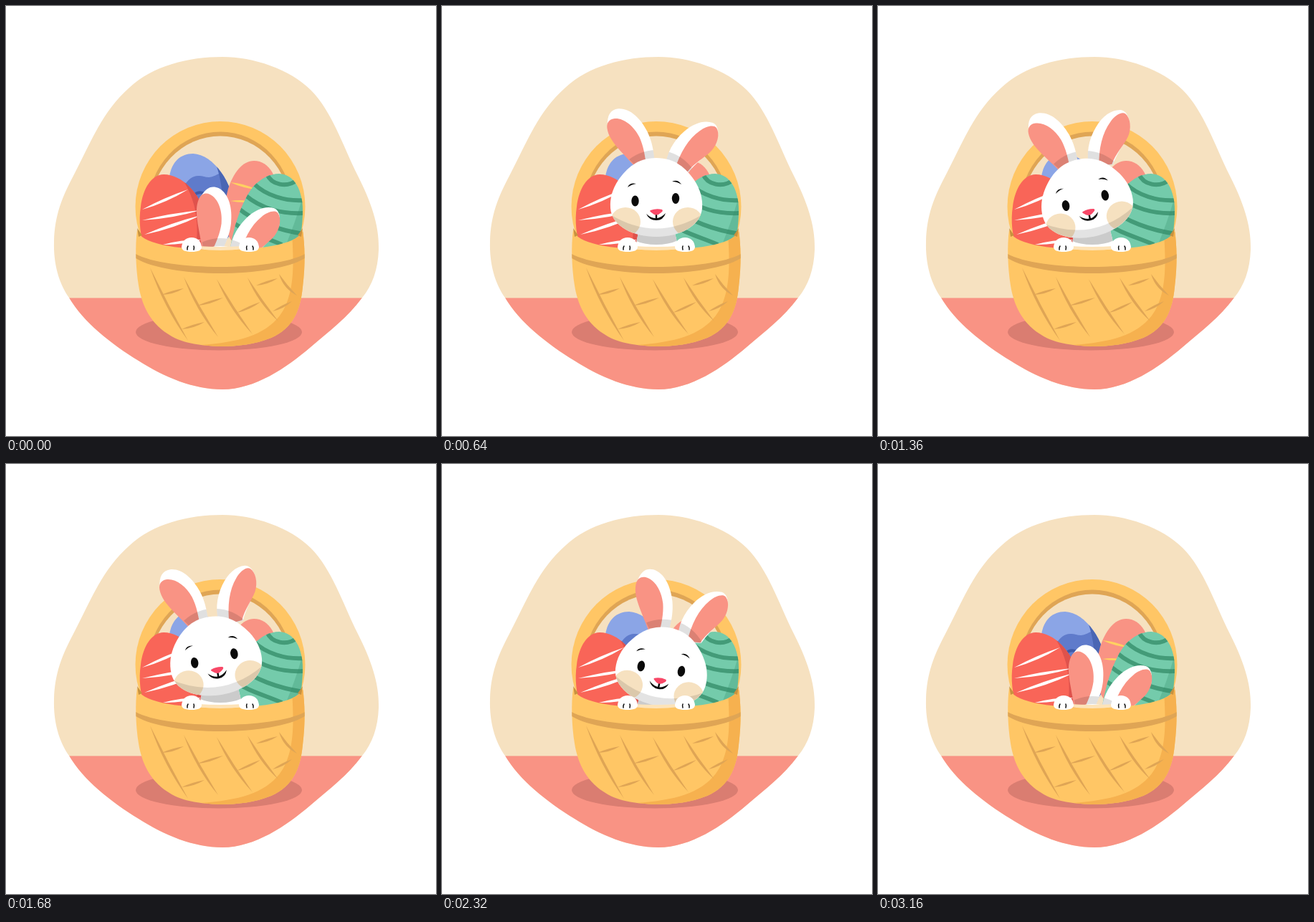
Recreate the animation shown at these times as an HTML page with a canvas. Size 600 px wide and 600 px high, loop 4 s.

```html
<!DOCTYPE html>
<html lang="en">
<head>
<meta charset="utf-8">
<title>Bunny in a basket</title>
<style>
html, body { margin: 0; width: 100%; height: 100%; overflow: hidden; background: #fff; }
canvas { display: block; width: 600px; height: 600px; }
</style>
</head>
<body>
<canvas id="stage"></canvas>
<script>
const canvas = document.getElementById('stage');
const ctx = canvas.getContext('2d');
const ratio = window.devicePixelRatio || 1;
canvas.width = canvas.height = 600 * ratio;

const LOOP = 4000, STEP = 40;
const CREAM = '#f6e1c0', CORAL = '#f99384', STRAW = '#ffc665', BROWN = '#dfa555', INK = '#0a0a0a';

// [time, value] keys
const tracks = {
  drop: [[0, 123], [360, 34], [620, 0], [2160, 0], [2680, 92], [2800, 113], [3160, 123]],
  tilt: [[0, 0], [960, 0], [1480, -13], [2300, 11], [3160, 0]],
  earL: [[0, 25], [360, 10], [580, -8], [960, 0], [2200, 0], [2680, 19], [3160, 25]],
  earR: [[0, -4], [620, 0], [960, 0], [1820, -16], [2240, -16], [2660, -6], [3160, -4]]
};

// Smooth curve through the keys, flat at turning points
function slope(keys, i) {
  const a = keys[i - 1], b = keys[i], c = keys[i + 1];
  if (!a || !c || (b[1] - a[1]) * (c[1] - b[1]) <= 0) return 0;
  return (c[1] - a[1]) / (c[0] - a[0]);
}
function sample(keys, t) {
  const i = keys.findIndex(k => k[0] > t) - 1;
  if (i < 0) return keys[keys.length - 1][1];
  const [t0, v0] = keys[i], [t1, v1] = keys[i + 1];
  const d = t1 - t0, p = (t - t0) / d, q = 1 - p;
  return q * q * (1 + 2 * p) * v0 + p * p * (3 - 2 * p) * v1 +
    d * p * q * (q * slope(keys, i) - p * slope(keys, i + 1));
}

const path = d => new Path2D(d);
function fill(shape, color) {
  ctx.fillStyle = color;
  ctx.fill(typeof shape === 'string' ? path(shape) : shape);
}
function line(d, color, width, cap = 'butt') {
  ctx.strokeStyle = color;
  ctx.lineWidth = width;
  ctx.lineCap = cap;
  ctx.stroke(path(d));
}
function oval(x, y, rx, ry, color) {
  ctx.beginPath();
  ctx.ellipse(x, y, rx, ry, 0, 0, Math.PI * 2);
  ctx.fillStyle = color;
  ctx.fill();
}
function inside(shape, draw) {
  ctx.save();
  ctx.clip(shape);
  draw();
  ctx.restore();
}
// Stroke tapered at both ends
function lens(x1, y1, x2, y2, bend, width, color) {
  const len = Math.hypot(x2 - x1, y2 - y1);
  const nx = (y1 - y2) / len, ny = (x2 - x1) / len;
  const mid = k => `${(x1 + x2) / 2 + nx * k} ${(y1 + y2) / 2 + ny * k}`;
  fill(`M${x1} ${y1}Q${mid(bend - width)} ${x2} ${y2}Q${mid(bend + width)} ${x1} ${y1}Z`, color);
}

const blob = path('M302 71C345 71 396 88 425 117C455 147 470 195 491 237C509 273 521 305 520 340C519 368 511 390 497 407C477 434 452 453 425 476C391 505 347 535 302 535C262 535 221 518 185 495C146 471 108 441 88 407C74 387 66 360 67 328C68 292 78 267 95 235C119 189 134 148 172 114C205 83 255 71 302 71Z');
const basket = path('M183 312C186 331 235 340 299 340C363 340 411 331 414 312C417 335 418 360 414 392C411 425 400 450 370 463C348 472 323 475 299 475C270 474 243 470 225 457C200 441 189 415 185 390C181 365 180 335 183 312Z');
const redEgg = path('M220 235C246 235 270 262 278 290C283 310 281 330 275 345L195 345C187 320 185 300 188 280C191 255 203 235 220 235Z');
const blueEgg = path('M261 206C290 207 317 248 319 285C320 315 305 340 280 340C250 330 226 260 228 238C231 218 243 206 261 206Z');
const pinkEgg = path('M346 216C368 216 380 240 380 270C380 320 350 340 325 335C300 325 303 280 310 255C317 233 330 216 346 216Z');
const greenEgg = path('M381 234C403 235 414 258 414 285C414 310 410 330 404 345L312 345C316 310 330 270 345 252C356 240 369 234 381 234Z');
const head = path('M299 212C325 212 340 226 352 243C360 255 364 268 363 282C361 308 330 322 299 322C268 322 237 308 235 282C234 268 238 255 246 243C258 226 273 212 299 212Z');
const body = path('M278 296L268 346L332 346L320 296Z');
const paw = path('M-14 3C-13 -5 -8 -10 0 -10C8 -10 13 -5 14 3C14 8 9 10 0 10C-9 10 -14 8 -14 3Z');
const ears = {
  earL: {
    x: 292, y: 225,
    outer: path('M272 222C258 203 240 183 239 160C240 145 246 138 257 138C273 139 286 155 293 175C298 190 299 205 297 232L276 234Z'),
    inner: path('M276 232C260 204 238 184 238 163C238 155 243 151 249 151C262 151 275 164 281 181C285 194 286 208 285 232Z')
  },
  earR: {
    x: 318, y: 222,
    outer: path('M311 228C313 205 323 188 338 175C352 163 366 159 378 163C384 166 386 172 385 182C383 200 360 212 344 232Z'),
    inner: path('M325 228C332 205 344 185 360 174C368 168 379 165 383 170C388 178 385 192 376 202C366 212 352 219 343 231Z')
  }
};

function drawRoom() {
  ctx.fillStyle = '#fff';
  ctx.fillRect(0, 0, 600, 600);
  fill(blob, CREAM);
  inside(blob, () => {
    ctx.fillStyle = CORAL;
    ctx.fillRect(0, 407.4, 600, 200);
  });
  oval(297, 455, 116, 25.5, '#da7d71');
}

function drawHandle() {
  oval(299, 280, 118.5, 119, STRAW);
  oval(299, 283, 101, 107.5, BROWN);
  oval(299, 284, 97.5, 102.5, CREAM);
}

function drawEggs() {
  fill(blueEgg, '#8ba5e6');
  inside(blueEgg, () => {
    fill('M235 262C248 258 252 237 268 237C280 237 280 243 297 234L330 230L330 345L240 345Z', '#5f7bcb');
    fill('M289 212C302 240 306 270 298 345L330 345L330 212Z', '#4a66b4');
    line('M262 264Q270 257 279 263', '#3f5aa8', 4);
  });

  fill(pinkEgg, CORAL);
  lens(313, 246, 350, 256, 0, 3.5, '#ffd161');
  lens(313, 272, 345, 273, 0, 3, '#ffd161');

  fill(greenEgg, '#74cbab');
  inside(greenEgg, () => {
    for (const d of [
      'M364 234C370 250 392 254 406 243',
      'M346 248C362 264 390 273 416 271',
      'M334 264C355 282 385 291 416 289',
      'M324 282C345 300 380 313 416 318',
      'M316 302C340 318 360 322 385 333'
    ]) line(d, '#439b78', 6);
    fill('M416 258C408 290 398 315 386 345L420 345L420 250Z', 'rgba(50,140,105,.28)');
  });

  fill(redEgg, '#f96558');
  inside(redEgg, () => fill('M249 246C266 275 270 305 264 345L290 345L290 250Z', '#df524c'));
  lens(190, 284, 254, 256, 1, 4, '#fff');
  lens(190, 299, 271, 285, 1, 4, '#fff');
  lens(193, 319, 272, 292, 1, 4.5, '#fff');
  lens(219, 333, 273, 326, 0, 4, '#fff');
}

function drawEars(pose) {
  const union = new Path2D();
  for (const name in ears) {
    const { x, y, outer, inner } = ears[name];
    const turn = new DOMMatrix().translate(x, y).rotate(pose[name]).translate(-x, -y);
    const turned = new Path2D();
    turned.addPath(outer, turn);
    const lining = new Path2D();
    lining.addPath(inner, turn);
    fill(turned, '#fff');
    fill(lining, CORAL);
    union.addPath(turned);
  }
  inside(union, () => oval(299, 263, 62, 62, 'rgba(0,0,0,.12)'));
}

function drawFace() {
  fill(head, '#fff');
  inside(head, () => {
    oval(256, 301, 21, 20, CREAM);
    oval(343, 301, 21, 20, CREAM);
    fill('M230 288Q299 333 368 288L368 330L230 330Z', 'rgba(0,0,0,.11)');
  });
  oval(269.5, 272, 5.2, 7.5, INK);
  oval(326, 268.5, 5.2, 7.5, INK);
  fill('M259 253Q262 246 271 248Q264 249 259 253Z', INK);
  fill('M321 245Q329 241 334 249Q328 245 321 245Z', INK);
  line('M299 290V297', INK, 2.4);
  fill('M285 290Q299 303 312 289Q309 299 299 299Q289 299 285 290Z', INK);
  fill('M291 285Q299 282 307 284Q309 286 306 288Q299 295 292 288Q289 286 291 285Z', '#f84867');
}

function drawBunny(pose) {
  ctx.save();
  ctx.translate(0, pose.drop);
  fill(body, '#fff');
  inside(body, () => oval(299, 313, 42, 20, '#cbcbcb'));
  ctx.translate(299, 313);
  ctx.rotate(pose.tilt * Math.PI / 180);
  ctx.translate(-299, -313);
  drawEars(pose);
  drawFace();
  ctx.restore();
}

function drawBasket() {
  fill(basket, STRAW);
  inside(basket, () => {
    fill('M399 320C403 370 400 408 382 432C360 460 325 469 272 473L300 490L430 470L430 310Z', '#f6b14f');
    fill('M181 346C225 370 373 370 417 346L417 352C370 380 228 380 181 352Z', BROWN);
  });
  for (const [x1, y1, x2, y2] of [
    [201, 365, 254, 467], [248, 378, 296, 462], [294, 381, 344, 458], [337, 379, 380, 440], [381, 374, 406, 404]
  ]) lens(x1, y1, x2, y2, 5, 3.5, BROWN);
  for (const [x1, y1, x2, y2] of [
    [217, 403, 248, 394], [245, 451, 277, 441], [267, 418, 303, 407],
    [322, 428, 355, 413], [349, 390, 379, 380], [372, 426, 399, 412]
  ]) lens(x1, y1, x2, y2, 1, 3.2, BROWN);
  fill('M183 310L190 320L185 322Z', '#c8923f');
  fill('M414 310L407 320L412 322Z', '#c8923f');
  fill('M268 335Q299 337 330 335L330 339Q299 343 268 339Z', '#fde3b8');
}

function drawPaws() {
  for (const [x, side] of [[259, 1], [339, -1]]) {
    ctx.save();
    ctx.translate(x, 333);
    ctx.scale(side, 1);
    fill(paw, '#fff');
    line('M-5 2Q-6.5 4 -6 7M3 2Q4 4 3 7', INK, 1.5, 'round');
    ctx.restore();
  }
}

function draw(t) {
  const pose = {};
  for (const name in tracks) pose[name] = sample(tracks[name], t);
  ctx.setTransform(ratio, 0, 0, ratio, 0, 0);
  drawRoom();
  drawHandle();
  drawEggs();
  drawBunny(pose);
  drawBasket();
  drawPaws();
}

let start = null;
function tick(now) {
  if (start === null) start = now;
  const t = (now - start) % LOOP;
  draw(Math.floor(t / STEP) * STEP);
  requestAnimationFrame(tick);
}
draw(0);
requestAnimationFrame(tick);
</script>
</body>
</html>
```
